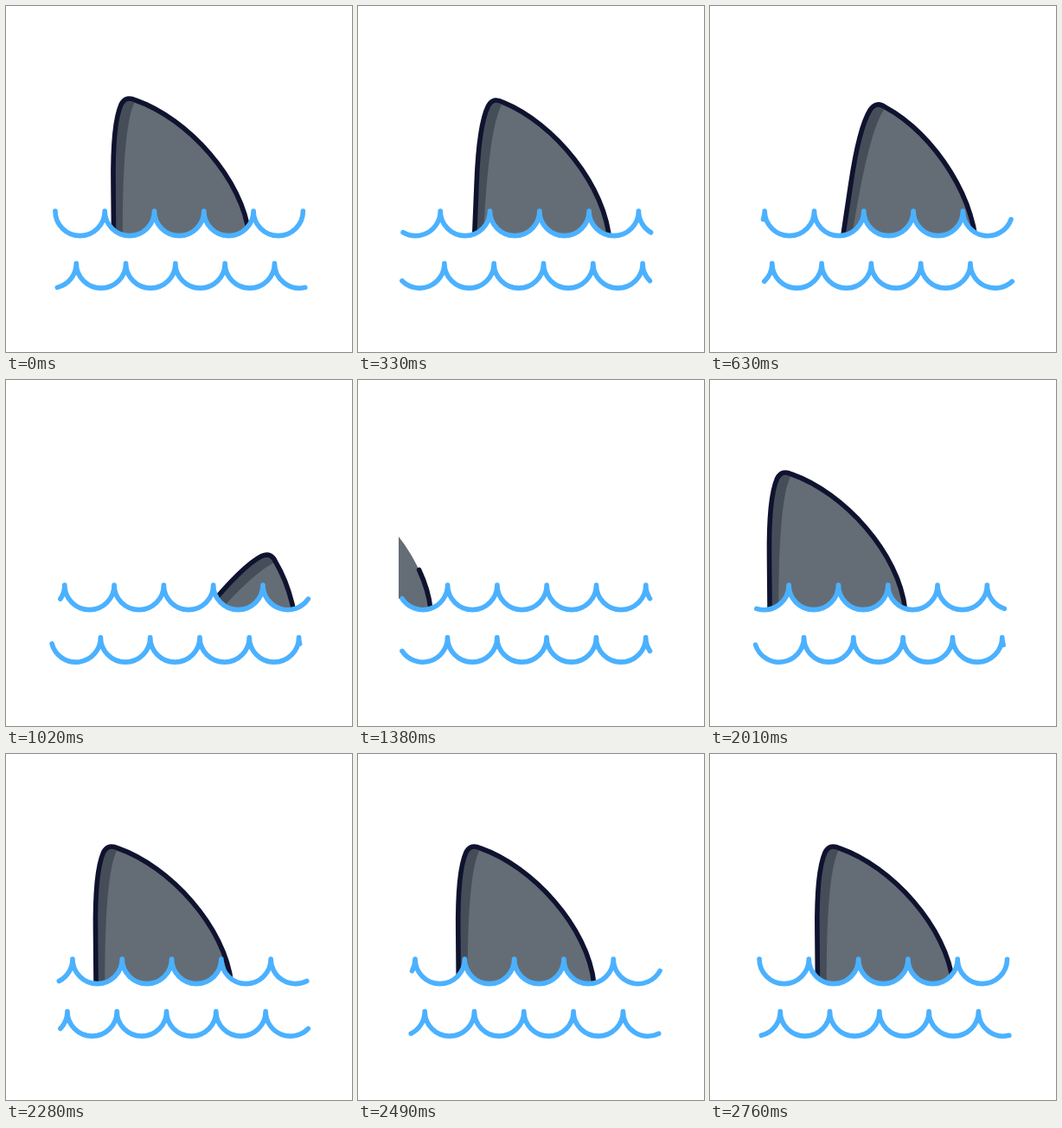
Write an HTML page that moves like this. It is 400 px wide and 400 px high and loops after 2.79 s.

```html
<!DOCTYPE html>
<html>
<head>
<meta charset="utf-8">
<style>
  html, body { margin: 0; width: 100%; height: 100%; overflow: hidden; background: #fff; }
  svg { display: block; width: 100vw; height: 100vh; }
  .line { fill: none; stroke-width: 5.6; stroke-linecap: round; stroke-linejoin: round; }
  .wave { stroke: #4bb1ff; }
</style>
</head>
<body>
<svg viewBox="0 0 400 400">
  <clipPath id="window"><polygon id="edge"/></clipPath>
  <clipPath id="right"><path d="M0 0H350V400H0z"/></clipPath>
  <g clip-path="url(#window)">
    <g class="fin">
      <path id="body" fill="#646d76"/>
      <path fill="#454e58" d="M124.5 290V262C124.5 245 124 225 124 205C123.5 165 126 130 133 114C137 106 143 105.500 150 109C137 130 135 205 135 262V290z"/>
    </g>
  </g>
  <g clip-path="url(#right)">
    <g class="fin"><path id="outline" class="line" stroke="#10132f"/></g>
  </g>
  <path id="water" fill="#fff"/>
  <path id="top" class="line wave"/>
  <path id="bottom" class="line wave"/>
</svg>
<script>
const LOOP = 2790, R = 28.65, TIP = [142, 107];
const FIN = 'M285 290L281 265C274 200 210 130 150 109C143 105.5 137 106 133 114' +
  'C126 130 123.5 165 124 205C124 225 124.5 245 124.5 262V290';
const $ = id => document.getElementById(id);
const set = (id, name, value) => $(id).setAttribute(name, value);

set('body', 'd', FIN + 'z');
set('outline', 'd', FIN);
const total = $('outline').getTotalLength();
const points = Array.from({ length: Math.ceil(total) }, (_, i) => $('outline').getPointAtLength(i));

// Smooth monotone curve through the keys, at rest at both ends
function curve(times, values) {
  const slopes = times.slice(1).map((t, i) => (values[i + 1] - values[i]) / (t - times[i]));
  const tangents = times.map((_, i) => {
    const a = slopes[i - 1], b = slopes[i];
    return a * b > 0 ? 2 * a * b / (a + b) : 0;
  });
  return t => {
    t = Math.max(times[0], Math.min(t, times.at(-1)));
    let i = 0;
    while (i < times.length - 2 && t > times[i + 1]) i++;
    const h = times[i + 1] - times[i], s = (t - times[i]) / h, u = 1 - s;
    return values[i] * u * u * (1 + 2 * s) + values[i + 1] * s * s * (3 - 2 * s) +
      h * s * u * (u * tangents[i] - s * tangents[i + 1]);
  };
}

const beats = [0, 630, 1020, 1380, 1710, 2280, LOOP];
const topShift = curve(beats, [0, -.89, -1.81, -3.185, -4.025, -4.65, -5]);
const bottomShift = curve(beats, [.425, 1.26, 1.916, 2.813, 4.226, 5.245, 5.425]);

const dive = [0, 630, 1020, 1170];
const diveX = curve(dive, [142, 195.5, 307, 355]);
const diveY = curve(dive, [107, 114, 204, 270]);
const diveTurn = curve(dive, [0, 9, 40, 55]);
const enter = curve([1100, 1380, 1710, 2280, LOOP], [-290, -197, -115, -20.5, 0]);

// Five arches of a scalloped line; the visible part slides along it as it moves
function wave(shift, y) {
  const q = shift - Math.floor(shift);
  const at = a => {
    const n = Math.floor(a), b = (a - n) * Math.PI;
    return [56.9 + 2 * R * (q + n) + R * (1 - Math.cos(b)), y + R * Math.sin(b)];
  };
  const stops = [-q];
  for (let n = Math.floor(-q) + 1; n < 5 - q; n++) stops.push(n);
  stops.push(5 - q);
  const d = stops.map((a, i) => (i ? `A${R} ${R} 0 0 0 ` : '') + at(a).join(' ')).join('');
  return { d, start: at(-q)[1], end: at(5 - q)[1] };
}

function draw(t) {
  const diving = t < 1200;
  const x = diving ? diveX(t) : TIP[0] + enter(t);
  const y = diving ? diveY(t) : TIP[1];
  const turn = diving ? diveTurn(t) : 0;
  const move = `translate(${x} ${y}) rotate(${turn}) translate(${-TIP[0]} ${-TIP[1]})`;
  document.querySelectorAll('.fin').forEach(g => g.setAttribute('transform', move));

  // Slanting left border where the fin emerges
  const k = Math.max(0, Math.min(1, (t - 1380) / 330));
  const border = v => 47 + k * (13 * (v - 111) / 129 - 4);
  set('edge', 'points', `${border(0)},0 350,0 350,400 ${border(400)},400`);
  const hidden = points.findIndex(p => p.x + x - TIP[0] < border(p.y) + 24 * (1 - k));
  set('outline', 'stroke-dasharray', `${hidden < 0 ? total + 1 : hidden} 2000`);

  const top = wave(topShift(t), 237);
  set('top', 'd', 'M' + top.d);
  set('water', 'd', `M0 ${top.start}L${top.d}L400 ${top.end}V400H0z`);
  set('bottom', 'd', 'M' + wave(bottomShift(t), 297.5).d);
}

const begin = performance.now();
function tick() {
  const t = (performance.now() - begin) % LOOP;
  draw(Math.floor(t / 30) * 30);
  requestAnimationFrame(tick);
}
tick();
</script>
</body>
</html>
```
